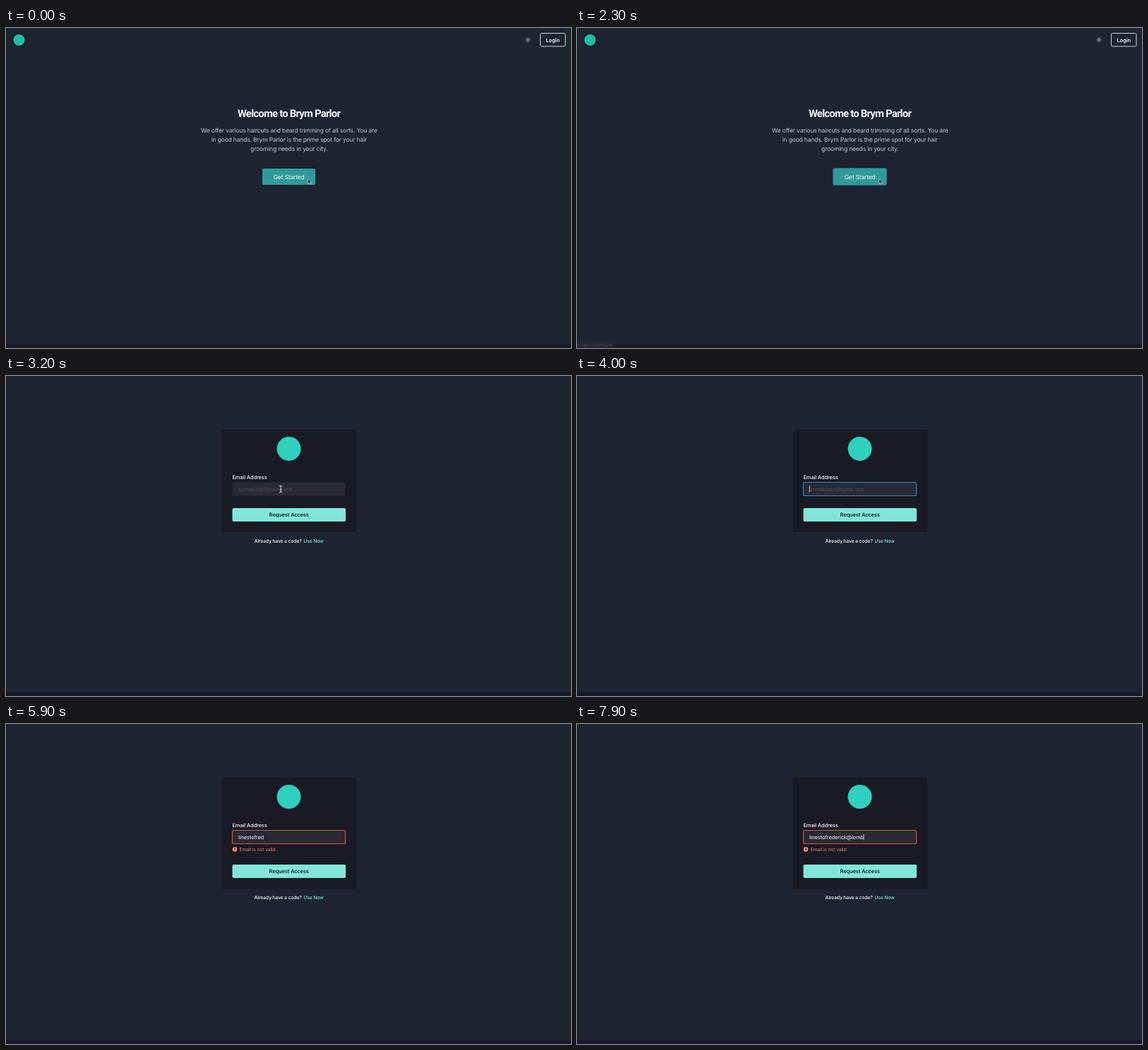
These frames come from a looping animation (800x453 px, 8 s). An HTML page:

```html
<!DOCTYPE html>
<html lang="en">
<head>
<meta charset="utf-8">
<title>Sign up</title>
<style>
  html, body { margin: 0; width: 100%; height: 100%; overflow: hidden; background: #1e2431; }
  svg { display: block; width: 100vw; height: 100vh; }
  text {
    font: 7.5px Inter, "Open Sans", sans-serif; fill: #f4f5f7;
    letter-spacing: -.02em; text-rendering: geometricPrecision;
  }
  .mid { text-anchor: middle; }
  .title { font: 700 14.8px Roboto, sans-serif; letter-spacing: -.05em; }
  .body { font-size: 8.5px; fill: #c3c6cb; }
  .cta { font-size: 8.5px; }
  .medium { font-weight: 500; }
  .bold { font-weight: 600; }
  .small { font-size: 6.8px; }
  .url { font-size: 5.4px; fill: #b4b5b8; }
  .mint { fill: #81e6d9; }
  .hint { fill: #4b4d56; }
  .error { fill: #ee837b; }
</style>
</head>
<body>
<svg viewBox="0 0 800 453" preserveAspectRatio="none">
  <rect width="800" height="453" fill="#1e2431"/>
  <rect y="448" width="800" height="5" fill="#191827"/>
  <rect width="1" height="453" fill="#171c27"/>

  <g id="home">
    <circle cx="18.5" cy="17" r="8" fill="#23bda5"/>
    <g stroke="#e8eaed" stroke-width=".8" fill="none">
      <circle cx="739" cy="16.7" r="1.5"/>
      <circle cx="739" cy="16.7" r="3.1" stroke-width="1" stroke-dasharray=".8 1.635"/>
    </g>
    <rect x="756.5" y="7.5" width="35.5" height="18.5" rx="1.8" fill="none" stroke="#d5d8dd"/>
    <text class="mid bold" x="774.2" y="19.5">Login</text>
    <text class="mid title" x="400.5" y="126">Welcome to Brym Parlor</text>
    <g class="mid">
      <text class="body" x="400.8" y="148.3">We offer various haircuts and beard trimming of all sorts. You are</text>
      <text class="body" x="400.8" y="161.1">in good hands. Brym Parlor is the prime spot for your hair</text>
      <text class="body" x="400.8" y="173.9">grooming needs in your city.</text>
    </g>
    <rect x="363" y="199" width="75" height="23" rx="1.5" fill="#2f9a9a"/>
    <rect id="ring" x="362.5" y="198.5" width="76" height="24" rx="2" fill="none" stroke="#3f8fd0" stroke-dasharray="1 .6"/>
    <text class="mid cta" x="400.6" y="213.6">Get Started</text>
    <g id="status">
      <path d="M0 444.5H52a2 2 0 0 1 2 2V453H0z" fill="#35363a"/>
      <text class="url" x="1" y="451">localhost:3000/auth</text>
    </g>
  </g>

  <g id="form">
    <rect id="card" x="305.5" y="76" width="190.5" height="145" fill="#191a24"/>
    <circle cx="400.5" cy="103" r="17" fill="#2fd0be"/>
    <text class="medium" x="320.5" y="145.6">Email Address</text>
    <rect id="field" x="320.5" y="150.5" width="160" height="19" rx="2" fill="#292a33" stroke-width="1.2"/>
    <text id="hint" class="hint" x="329" y="162.6">somebody@home.test</text>
    <text id="email" x="329" y="162.6"></text>
    <rect id="caret" y="155.5" width=".8" height="9" fill="#eef0f2"/>
    <g id="warning">
      <circle cx="324" cy="177.4" r="3.4" class="error"/>
      <path d="M324 175.4v2.2m0 .9v.9" stroke="#191a24" stroke-width=".9"/>
      <text class="small error" x="330.5" y="179.9">Email is not valid</text>
    </g>
    <g id="lower">
      <rect x="320.5" y="187" width="160.5" height="19" rx="2" class="mint"/>
      <text class="mid bold" style="fill:#1b2330" x="400.7" y="199.2">Request Access</text>
      <text class="small medium" x="351.5" y="235.5">Already have a code?</text>
      <text class="small medium mint" x="421.3" y="235.5">Use Now</text>
    </g>
  </g>

  <path id="arrow" d="M0 0V6.8L1.6 5.3 2.7 7.8 3.9 7.3 2.8 4.9H5z" fill="#000" stroke="#fff" stroke-width=".6"/>
  <path id="beam" d="M386.9 155.3q2.1 0 2.1 1.2 0-1.2 2.1-1.2M389 156v8.5M386.9 164.9q2.1 0 2.1-1.2 0 1.2 2.1 1.2M387.8 160.8h2.4" fill="none" stroke="#d6d7d9" stroke-width="1"/>
</svg>
<script>
const LOOP = 8000, CLICK = 2100, SWITCH = 2500, FOCUS = 3500, TYPE = 4200, SLOWER = 5900;
const ADDRESS = "linestofrederick@lomb";
const $ = id => document.getElementById(id);
const show = (id, on) => $(id).style.display = on ? "" : "none";
const ramp = (t, from, to) => Math.min(1, Math.max(0, (t - from) / (to - from)));

function typedCount(t) {
  if (t < TYPE) return 0;
  return t < SLOWER ? 1 + Math.floor((t - TYPE) / 170) : 11 + Math.floor((t - SLOWER) / 200);
}

function draw(t) {
  const typed = ADDRESS.slice(0, typedCount(t));
  const invalid = typed !== "", focused = t >= FOCUS;

  show("home", t < SWITCH);
  show("ring", t >= CLICK);
  $("status").setAttribute("opacity", ramp(t, 300, 800) * (1 - ramp(t, CLICK, 2400)));

  show("form", t >= SWITCH);
  $("email").textContent = typed;
  show("hint", !invalid);
  show("warning", invalid);
  $("field").setAttribute("stroke", invalid ? "#d9503f" : focused ? "#3182ce" : "none");
  $("card").setAttribute("height", invalid ? 157 : 145);
  $("lower").setAttribute("transform", `translate(0 ${invalid ? 12 : 0})`);
  show("caret", focused && !(t >= SLOWER && t < SLOWER + 100));
  $("caret").setAttribute("x", 328.8 + (invalid ? $("email").getComputedTextLength() : 0));

  // The pointer glides from the button into the field.
  const p = ramp(t, 2600, 3000), glide = p * p * (3 - 2 * p);
  $("arrow").setAttribute("transform", `translate(${427.7 - 39 * glide} ${213.7 - 53 * glide})`);
  show("arrow", p < 1);
  show("beam", p === 1 && t < 3900);
}

function tick() {
  draw(performance.now() % LOOP);
  requestAnimationFrame(tick);
}
tick();
</script>
</body>
</html>
```
